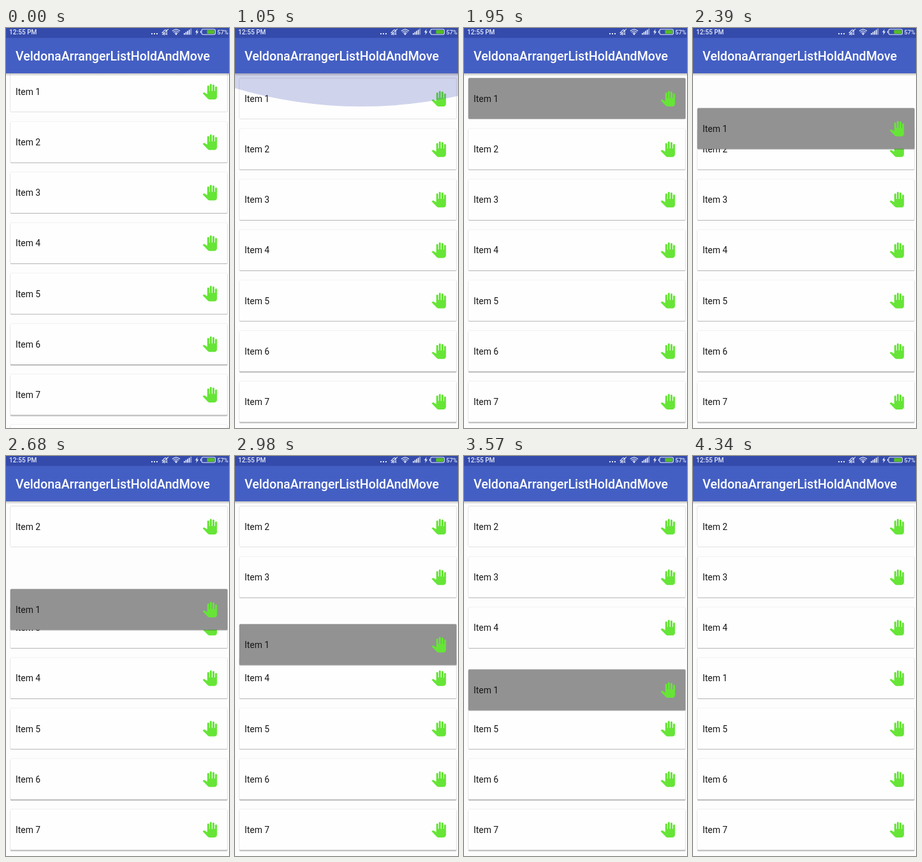
An HTML page that plays this animation: 350 px wide and 627 px high, repeating every 4440 ms.

```html
<!DOCTYPE html>
<html lang="en">
<head>
<meta charset="utf-8">
<title>Reorderable list</title>
<style>
  html, body { margin: 0; width: 100%; height: 100%; overflow: hidden; background: #fdfdfd; }
  svg { display: block; width: 100%; height: 100%; }
  text { font-family: Roboto, "Noto Sans", sans-serif; }
  .label { font-size: 13.9px; fill: #161616; }
  .status { font-weight: 500; fill: #e4e9f8; }
</style>
</head>
<body>
<svg viewBox="0 0 350 627">
  <defs>
    <linearGradient id="fade" x2="0" y2="1">
      <stop offset="0" stop-color="#000" stop-opacity=".24"/>
      <stop offset="1" stop-color="#000" stop-opacity="0"/>
    </linearGradient>
    <path id="hand" d="M23 5.5V20c0 2.2-1.8 4-4 4h-7.3c-1.1 0-2.1-.4-2.85-1.2L1 14.8l1.3-1.2c.4-.35.9-.4 1.4-.15L8 15.9V4a1.5 1.5 0 0 1 3 0v7h1V1.5a1.5 1.5 0 0 1 3 0V11h1V2.5a1.5 1.5 0 0 1 3 0V11h1V5.5a1.5 1.5 0 0 1 3 0z"/>
  </defs>
  <rect width="350" height="627" fill="#fdfdfd"/>
  <g id="list"></g>
  <ellipse id="glow" cx="198.5" rx="525" fill="#3f51b5"/>

  <rect y="71" width="350" height="4.5" fill="url(#fade)"/>
  <rect width="350" height="71" fill="#445fc3"/>
  <rect width="350" height="15.5" fill="#344bab"/>
  <text x="15" y="51" font-size="19.65" font-weight="500" fill="#fff">VeldonaArrangerListHoldAndMove</text>

  <text class="status" x="5" y="9.8" font-size="10.1">12:55 PM</text>
  <text class="status" x="331.5" y="9.6" font-size="9.3">57%</text>
  <g fill="#e4e9f8">
    <path d="M228 8h2v2h-2zm4 0h2v2h-2zm4 0h2v2h-2z"/>
    <path d="M279 8h1.8v2.5H279zm2.6-1.8h1.8v4.3h-1.8zm2.6-1.8h1.8v6.1h-1.8zm2.6-1.7h1.8v7.8h-1.8z"/>
    <path d="M289.4 1h1.8v9.5h-1.8z" opacity=".55"/>
    <path d="M300.6 1.5L297 6.7h2.2l-.9 4.2 3.9-5.5h-2.3z"/>
    <circle cx="267" cy="9.6" r="1.4"/>
  </g>
  <g fill="none" stroke="#e4e9f8" stroke-width="1.1" stroke-linecap="round">
    <path d="M246 8.8c1.6-1.4 1-6 3.8-6s2.3 4.6 3.9 6zM248.6 10.7h2.4" transform="rotate(20 250 6)"/>
    <path d="M245.4 10.4l9.2-8.6"/>
    <path d="M261.3 4.5q5.7-4.8 11.4 0M263 6.4q4-3.3 8 0M264.8 8.1q2.2-1.7 4.4 0"/>
    <rect x="307" y="2" width="21.5" height="8.2" rx="2.2"/>
    <path d="M305.5 5v2.2"/>
  </g>
  <rect x="315.5" y="3.3" width="11.8" height="5.6" rx="1" fill="#55bd25"/>
</svg>
<script>
const LOOP = 4440, TOP = 78.6, PITCH = 79.15, COUNT = 8;
const SCROLL_END = 1050, GRAB = 1950, DROP = 3870;

// [start time, value]: each value holds until the next start
const dragSteps = [[0, 0], [2390, 47], [2540, 97], [2680, 130], [2830, 158], [2980, 185],
  [3130, 232], [3280, 240], [3430, 253], [3570, 256], [3720, 254.5], [DROP, 3 * PITCH]];
const glowSteps = [[0, 0], [1050, .74], [1200, .56], [1350, .28], [1500, 0]];
const swapTimes = [2680, 2980, 3280];

const list = document.getElementById("list");
const glow = document.getElementById("glow");

function add(parent, tag, attrs) {
  const node = document.createElementNS("http://www.w3.org/2000/svg", tag);
  for (const key in attrs) node.setAttribute(key, attrs[key]);
  return parent.appendChild(node);
}

function makeCard(i) {
  const group = add(list, "g", {});
  const face = add(group, "rect", {
    x: 6.8, width: 340.8, height: 64, rx: 1.5,
    stroke: "#000", "stroke-opacity": .06, "stroke-width": .9
  });
  add(group, "text", { class: "label", x: 15, y: 37.4 }).textContent = "Item " + (i + 1);
  add(group, "use", { href: "#hand", fill: "#66e537", transform: "translate(307.7 19.9) scale(1.02)" });
  return { group, face };
}

const cards = Array.from({ length: COUNT }, (_, i) => makeCard(i));
list.appendChild(cards[0].group); // the dragged card stays on top

function stepAt(steps, t) {
  let value = 0;
  for (const [start, v] of steps) if (t >= start) value = v;
  return value;
}

function placeCard(card, y) {
  card.group.setAttribute("transform", `translate(0 ${y})`);
  const drop = .7 + Math.max(0, y) / 320;
  card.face.style.filter = `drop-shadow(0 ${drop}px .7px rgba(0,0,0,.25))`;
}

function draw(t) {
  const scroll = t < SCROLL_END ? -11 : 0;
  cards.forEach((card, i) => {
    const swapped = i > 0 && t >= swapTimes[i - 1];
    const offset = i ? (swapped ? i - 1 : i) * PITCH : stepAt(dragSteps, t);
    placeCard(card, TOP + scroll + offset);
    const held = i === 0 && t >= GRAB && t < DROP;
    card.face.setAttribute("fill", held ? "#929292" : "#fefefe");
  });

  const s = stepAt(glowSteps, t), ry = 525 * s;
  glow.setAttribute("ry", ry);
  glow.setAttribute("cy", 71 + 70.3 * s - ry);
  glow.setAttribute("fill-opacity", s * .33);
}

const start = performance.now();

function tick() {
  draw((performance.now() - start) % LOOP);
  requestAnimationFrame(tick);
}

tick();
</script>
</body>
</html>
```
